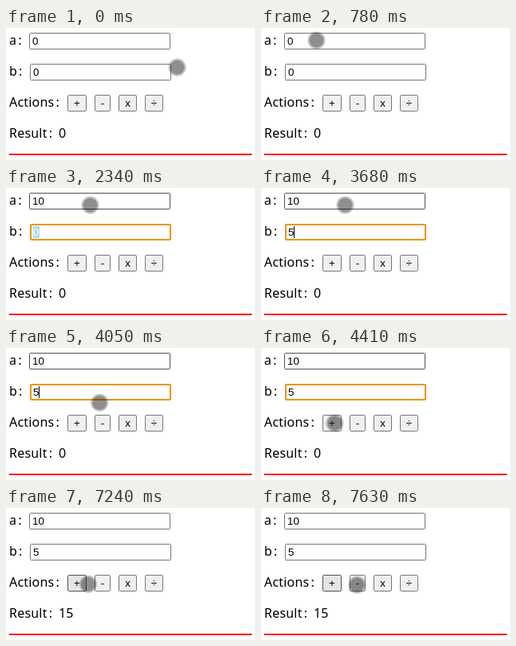
An HTML page for the animation above (8000 ms loop, 312x166 px).

```html
<!DOCTYPE html>
<html lang="en">
<head>
<meta charset="utf-8">
<title>Calculator</title>
<style>
html, body { margin: 0; width: 100%; height: 100%; overflow: hidden; background: #fff; }
svg { display: block; width: 312px; height: 166px; }
text { font: 16px "Noto Sans", "Open Sans", sans-serif; letter-spacing: .2px; }
.ui { font: 13.333px "Liberation Sans", Arial, sans-serif; letter-spacing: 0; }
.box { fill: #fff; stroke: #767676; }
.box.hover { stroke: #4f4f4f; }
.box.focus { stroke: #e59700; stroke-width: 2; }
.button { fill: #efefef; stroke: #767676; }
.button.hover { fill: #e5e5e5; stroke: #4f4f4f; }
.button.active { fill: #f5f5f5; stroke: #8d8d8d; }
</style>
</head>
<body>
<svg id="stage" viewBox="0 0 312 166"></svg>
<script>
const LOOP = 8000, STEP = 120, BLINK = 500;
const HOVER = 4680, PRESS = 5810, RELEASE = 5960;
const stage = document.getElementById('stage');

function set(el, attrs) {
  for (const key in attrs) el.setAttribute(key, attrs[key]);
}
function add(tag, attrs, text = '', parent = stage) {
  const el = document.createElementNS('http://www.w3.org/2000/svg', tag);
  set(el, attrs);
  el.textContent = text;
  return parent.appendChild(el);
}

// Each entry of values replaces the initial 0, one keystroke per STEP from typeAt
function input(x, y, { focus, blur, typeAt, values, selectAll }) {
  const box = add('rect', { rx: 1.2 });
  const mark = add('rect', { x: x + 4, y: y + 3, width: 8, height: 15, fill: '#a9d9f1' });
  const text = add('text', { class: 'ui', x: x + 4, y: y + 15 });
  const caret = add('rect', { y: y + 3, width: 1, height: 15 });

  return t => {
    const key = Math.min(Math.floor((t - typeAt) / STEP), values.length - 1);
    const value = key < 0 ? '0' : values[key];
    const focused = t >= focus && t < blur;
    const selected = focused && selectAll && key < 0;
    const lastEvent = key < 0 ? focus : typeAt + key * STEP;
    const lit = Math.floor((t - lastEvent) / BLINK) % 2 === 0;
    const state = focused ? 'focus' : t >= blur && t < PRESS ? 'hover' : '';
    const inset = focused ? 1 : 0.5;

    set(box, {
      class: 'box ' + state, x: x + inset, y: y + inset,
      width: 177 - 2 * inset, height: 21 - 2 * inset
    });
    set(mark, { opacity: +!!selected });
    set(text, { fill: selected ? '#fff' : '#000' });
    text.textContent = value;
    set(caret, {
      x: x + 4 + Math.floor(value.length * 7.41),
      opacity: +(focused && !selected && lit)
    });
  };
}

['a', 'b', 'Actions', 'Result'].forEach((name, row) => {
  const label = add('text', { x: 4, y: 21 + 39 * row }, name);
  add('tspan', { dx: 2 }, ':', label);
});
const result = add('text', { x: 66, y: 138 });

const inputs = [
  input(29, 6, { focus: 1070, blur: 2340, typeAt: 1760, values: ['', '1', '10'] }),
  input(30, 45, { focus: 2340, blur: PRESS, typeAt: 3680, values: ['5'], selectAll: true })
];

let left = 77;
const [plus] = [['+', 24], ['-', 20], ['x', 23], ['÷', 23]].map(([sign, width]) => {
  const box = add('rect', { class: 'button', x: left + 0.5, y: 84.5, width: width - 1, height: 20, rx: 1.7 });
  add('text', { class: 'ui', x: left + width / 2, y: 99, 'text-anchor': 'middle' }, sign);
  left += width + 10;
  return box;
});
add('rect', { x: 4, y: 158, width: 304, height: 2, fill: '#f00' });

const pointer = add('g', { fill: '#1e1e1e' });
add('circle', { r: 11, 'fill-opacity': 0.27 }, '', pointer);
add('circle', { r: 9, 'fill-opacity': 0.31 }, '', pointer);

// Stops of the pointer: start of the move, number of steps, place reached
const moves = [
  [120, 1, 198, 47], [400, 4, 69.5, 15.5], [1220, 2, 105.5, 21.5], [3800, 4, 118, 72],
  [4290, 2, 92.5, 94.5], [4530, 2, 89.5, 95], [7240, 4, 120.3, 96.8]
];
function pointerAt(t) {
  let x = 214.5, y = 49.5;
  for (const [start, steps, toX, toY] of moves) {
    if (t < start) break;
    const p = Math.min(1, (Math.floor((t - start) / STEP) + 1) / steps);
    const eased = 1 - (1 - p) ** 2;
    x += (toX - x) * eased;
    y += (toY - y) * eased;
  }
  return [x, y];
}

function draw(t) {
  inputs.forEach(update => update(t));
  const state = t < HOVER ? '' : t >= PRESS && t < RELEASE ? 'active' : 'hover';
  set(plus, { class: 'button ' + state });
  result.textContent = t < PRESS ? '0' : '15';
  set(pointer, { transform: `translate(${pointerAt(t)})` });
}

const start = performance.now();
function tick() {
  draw((performance.now() - start) % LOOP);
  requestAnimationFrame(tick);
}
tick();
</script>
</body>
</html>
```
